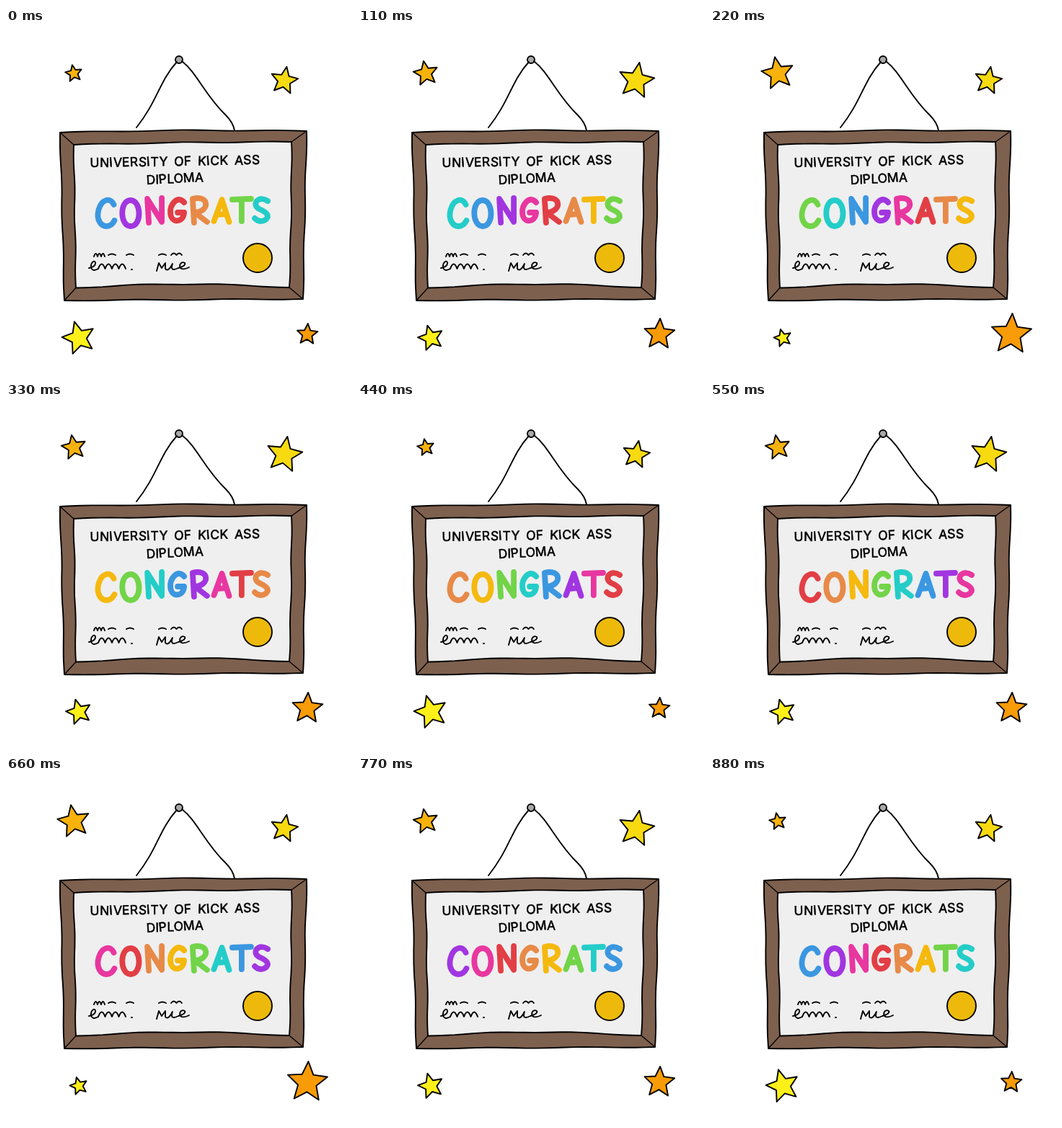
An HTML page for the animation above (990 ms loop, 480 by 480 pixels).

```html
<!DOCTYPE html>
<html lang="en">
<head>
<meta charset="utf-8">
<title>Congrats diploma</title>
<style>
  html, body { margin: 0; height: 100%; overflow: hidden; background: #fff; }
  svg { display: block; width: 100vw; height: 100vh; }
  path, circle { fill: none; stroke: #000; stroke-width: 1.9; stroke-linecap: round; stroke-linejoin: round; }
  #word path { stroke-width: 7.8; }
  text { font: 17.5px Inter, "Open Sans", sans-serif; word-spacing: 3px; stroke: #000; stroke-width: .55; stroke-linejoin: round; }
</style>
</head>
<body>
<svg viewBox="0 0 480 480">
  <circle cx="240" cy="44" r="5" style="fill:#a8a8a8"/>
  <path d="M237 47C212 75 211 100 181 138M244 46C265 62 275 92 305 121Q315 131 317 142"/>
  <g id="frame"></g>
  <g id="scribbles">
    <path d="M115 333C127 331 125 322 121 324C116 327 116 341 128 334"/>
    <path d="M174 335h1M209 337L212 326L216 333L221 326V334Q225 339 231 327Q227 339 239 333Q250 330 248 326C240 321 236 341 254 332"/>
  </g>
  <circle cx="349" cy="319" r="20" style="fill:#edba0b"/>
  <text x="116.5" y="193" letter-spacing=".4" transform="rotate(-1 116 193)">UNIVERSITY OF KICK ASS</text>
  <text x="195" y="217" transform="rotate(-3 195 217)">DIPLOMA</text>
  <g id="word" role="img" aria-label="CONGRATS"></g>
  <g id="stars"></g>
</svg>
<script>
const STEP = 110, STEPS = 9;
const RAINBOW = ['#e23e45', '#e78a48', '#f5b90e', '#72d448', '#24cdc8', '#3b97e0', '#a136e0', '#e837a0'];

// Brush strokes around each letter's centre.
const GLYPHS = {
  C: 'M11-8C6-19-6-15-10-1C-14 14-6 22 1 22Q8 22 12 14',
  O: 'M0-14C-16-14-15 22 0 22C16 22 15-14 0-14Z',
  N: 'M-8 17L-10-16L10 16V-17',
  G: 'M9-11C0-22-11-8-10 4C-9 18 8 18 9 3H0',
  R: 'M-8 17L-10-16C14-22 14 2-7 3L10 16',
  A: 'M-10 15L1-15L11 16M-6 6L6 5',
  T: 'M-13-15L13-16M0-15V15',
  S: 'M9-13C-4-22-14-8-3-2C9 3 13 9 4 14Q-3 17-9 11'
};

// Each star swells and shrinks around its mean radius.
const STARS = [
  { x: 94, y: 63, tilt: -100, radius: 17.5, swing: 5.5, beats: 1, fill: '#f7b20c' },
  { x: 386, y: 73, tilt: -80, radius: 22.5, swing: 3, beats: 2, fill: '#f7da10' },
  { x: 101, y: 430, tilt: -105, radius: 18, swing: -5.5, beats: 1, fill: '#fff01a' },
  { x: 418, y: 425, tilt: -87, radius: 22, swing: 7, beats: 1, fill: '#f79b06' }
];

function addPath(parentId, d, fill = 'none') {
  const path = document.createElementNS('http://www.w3.org/2000/svg', 'path');
  path.setAttribute('d', d);
  path.style.fill = fill;
  return document.getElementById(parentId).appendChild(path);
}

const polygon = points => 'M' + points.map(p => p.map(v => v.toFixed(1)).join(' ')).join('L') + 'Z';

function starPath({ x, y, tilt }, radius) {
  return polygon(Array.from({ length: 10 }, (_, i) => {
    const angle = (tilt + i * 36) * Math.PI / 180;
    const reach = i % 2 ? radius * .46 : radius;
    return [x + reach * Math.cos(angle), y + reach * Math.sin(angle)];
  }));
}

// Hand-drawn box: every edge bows outwards and trembles slightly.
function wobblyBox(corners, bows) {
  const samples = 24;
  return polygon(corners.flatMap(([x, y], side) => {
    const [nextX, nextY] = corners[(side + 1) % 4];
    const dx = nextX - x, dy = nextY - y, length = Math.hypot(dx, dy);
    return Array.from({ length: samples }, (_, i) => {
      const t = i / samples;
      const out = bows[side] * Math.sin(Math.PI * t) + .6 * Math.sin(5 * Math.PI * t);
      return [x + dx * t + out * dy / length, y + dy * t - out * dx / length];
    });
  }));
}

function arches(x, y, width, count, height) {
  const span = width / count;
  return `M${x} ${y}` + `q${span / 2} ${-height} ${span} 0`.repeat(count);
}

const outer = [[75, 145], [417, 143], [412, 376], [81, 378]];
const inner = [[94, 162], [396, 158], [393, 360], [97, 360.5]];
addPath('frame', wobblyBox(outer, [2, 0, 0, 0]), '#7e604e');
addPath('frame', wobblyBox(inner, [1, 1, -5, 0]), '#efefef');
outer.forEach((corner, i) => addPath('frame', `M${corner}L${inner[i]}`).style.strokeWidth = 1.3);

addPath('scribbles', arches(122, 317, 15, 3, 8));
for (const x of [142, 167, 212]) addPath('scribbles', arches(x, 315, 10, 1, 3));
addPath('scribbles', arches(229, 315, 15, 2, 5));
addPath('scribbles', arches(128, 334, 38, 4, 13));
addPath('scribbles', starPath({ x: 347, y: 318, tilt: -87 }, 12)).style.strokeWidth = 1.5;

for (const text of document.querySelectorAll('text')) {
  text.setAttribute('rotate', [...text.textContent].map((_, i) => (3 * Math.sin(i * 2.4)).toFixed(1)).join(' '));
}

const letters = [...'CONGRATS'].map((letter, i) => {
  const path = addPath('word', GLYPHS[letter]);
  path.setAttribute('transform', `translate(${138.5 + 35 * i - .6 * i * i} 253)`);
  return path;
});
const starPaths = STARS.map(star => addPath('stars', '', star.fill));

function draw(time) {
  const step = Math.floor(time / STEP) % STEPS;
  letters.forEach((letter, i) => letter.style.stroke = RAINBOW[(i + 13 - step) % RAINBOW.length]);
  STARS.forEach((star, i) => {
    const radius = star.radius - star.swing * Math.cos(star.beats * step * Math.PI / 2);
    starPaths[i].setAttribute('d', starPath(star, radius));
  });
}

const start = performance.now();
function tick() {
  draw(performance.now() - start);
  requestAnimationFrame(tick);
}
tick();
</script>
</body>
</html>
```
